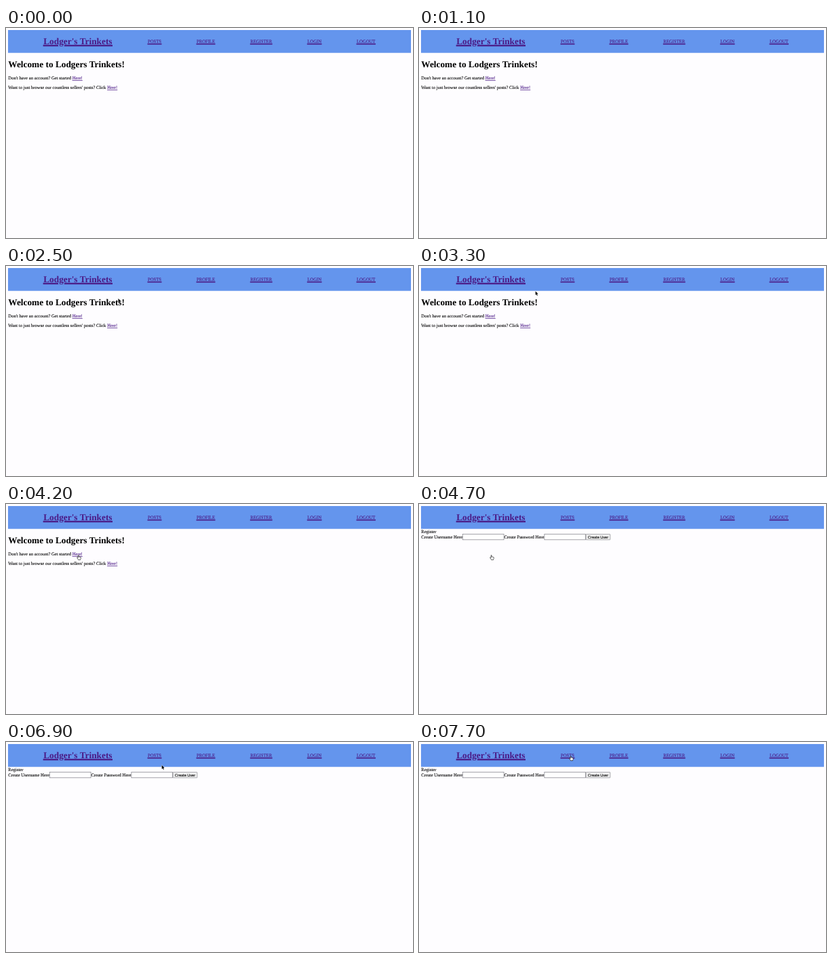
An HTML page that plays this animation: 600x310 px, repeating every 8 s.

```html
<!DOCTYPE html>
<html lang="en">
<head>
<meta charset="utf-8">
<title>Lodger's Trinkets</title>
<style>
  html, body { margin: 0; width: 100%; height: 100%; overflow: hidden; background: #fefdff; }
  svg { display: block; width: 600px; height: 310px; }
  text {
    font: 6.667px "Liberation Serif", "Times New Roman", serif;
    text-rendering: geometricPrecision;
    stroke: #000; stroke-width: .1;
  }
  .big { font-size: 13.333px; font-weight: bold; stroke-width: 0; }
  .link { fill: #4b1a86; text-decoration: underline .5px; text-underline-offset: .6px; }
  .link, .link text { stroke: #4b1a86; }
  .label { font: 5.556px "Liberation Sans", Arial, sans-serif; }
  .box { fill: #fff; stroke: #85858c; stroke-width: .75; }
  .button { fill: #efefef; stroke: #77777c; stroke-width: .6; }
</style>
</head>
<body>
<svg viewBox="0 0 600 310">
  <rect x="3" y="3" width="594" height="33.7" fill="#6495ed"/>
  <g class="link">
    <text class="big" x="55.2" y="24.3">Lodger's Trinkets</text>
    <text x="209" y="22.3">POSTS</text>
    <text x="281" y="22.3">PROFILE</text>
    <text x="360.3" y="22.3">REGISTER</text>
    <text x="444.3" y="22.3">LOGIN</text>
    <text x="517" y="22.3">LOGOUT</text>
  </g>

  <g id="home">
    <text class="big" x="3.33" y="57.8">Welcome to Lodgers Trinkets!</text>
    <text x="3.33" y="76">Don't have an account? Get started <tspan class="link">Here!</tspan></text>
    <text x="3.33" y="90.2">Want to just browse our countless sellers' posts? Click <tspan class="link">Here!</tspan></text>
  </g>

  <g id="register">
    <text x="3.33" y="42.8">Register</text>
    <text x="3.33" y="50.7">Create Username Here</text>
    <rect class="box" x="64.5" y="44.6" width="60.6" height="8.2"/>
    <text x="125.4" y="50.7">Create Password Here</text>
    <rect class="box" x="184.9" y="44.6" width="60.6" height="8.2"/>
    <rect class="button" x="246.1" y="44.6" width="35.8" height="8.2" rx=".6"/>
    <text class="label" x="249.1" y="50.6">Create User</text>
  </g>

  <g id="cursor">
    <path id="arrow" d="M0 0V5.6L1.3 4.4 2.2 6.5 3.2 6.1 2.3 4 4 3.9Z"
      fill="#000" stroke="#fff" stroke-width=".7" paint-order="stroke" stroke-linejoin="round"/>
    <path id="hand" d="M-.8 3.6V.6Q-.8 0-.3 0T.2.6V2.4Q1 2 1.3 2.6 2.1 2.3 2.4 2.9 3.3 2.6 3.3 3.6V4.7Q3.2 5.5 2.7 6V6.9H-.5Q-.6 6.2-1.1 5.7L-2.2 4Q-2.5 3.2-1.8 3.1-1.3 3.1-.8 3.9Z"
      fill="#fff" stroke="#000" stroke-width=".6" stroke-linejoin="round"/>
  </g>
</svg>
<script>
  const LOOP = 8000, STEP = 100, ENTER = 1500, CLICK = 4600, REACH = 5;

  const entry = { x: 262, y: 143 };
  const here = { x: 107, y: 75.5 };
  const posts = { x: 224, y: 20.6 };

  // The pointer rests between moves and glides straight during each one.
  const moves = [
    { from: ENTER, to: 1700, x: 243.7, y: 57.3 },
    { from: 1900, to: 2300, ...here },
    { from: 2300, to: 2700, ...posts },
    { from: 3000, to: 3300, x: 171.7, y: 37.3 },
    { from: 3300, to: 3600, x: 138.5, y: 67.3 },
    { from: 3900, to: 4200, ...here },
    { from: 5800, to: 6300, x: 248, y: 59 },
    { from: 6500, to: 7100, x: 220.5, y: 22 },
    { from: 7400, to: 7700, ...posts }
  ];

  const byId = id => document.getElementById(id);
  const [home, register, cursor, arrow, hand] =
    ["home", "register", "cursor", "arrow", "hand"].map(byId);
  const show = (node, on) => { node.style.display = on ? "" : "none"; };

  function pointerAt(t) {
    return moves.reduce((p, move) => {
      const k = Math.min(1, Math.max(0, (t - move.from) / (move.to - move.from)));
      return { x: p.x + (move.x - p.x) * k, y: p.y + (move.y - p.y) * k };
    }, entry);
  }

  function render(now) {
    const t = Math.floor((now % LOOP) / STEP) * STEP;
    const { x, y } = pointerAt(t);
    const onLink = [here, posts].some(link => Math.hypot(x - link.x, y - link.y) < REACH);

    show(home, t < CLICK);
    show(register, t >= CLICK);
    show(cursor, t >= ENTER);
    show(arrow, !onLink);
    show(hand, onLink);
    cursor.setAttribute("transform", `translate(${x} ${y})`);
  }

  const start = performance.now();
  function tick() {
    render(performance.now() - start);
    requestAnimationFrame(tick);
  }
  tick();
</script>
</body>
</html>
```
